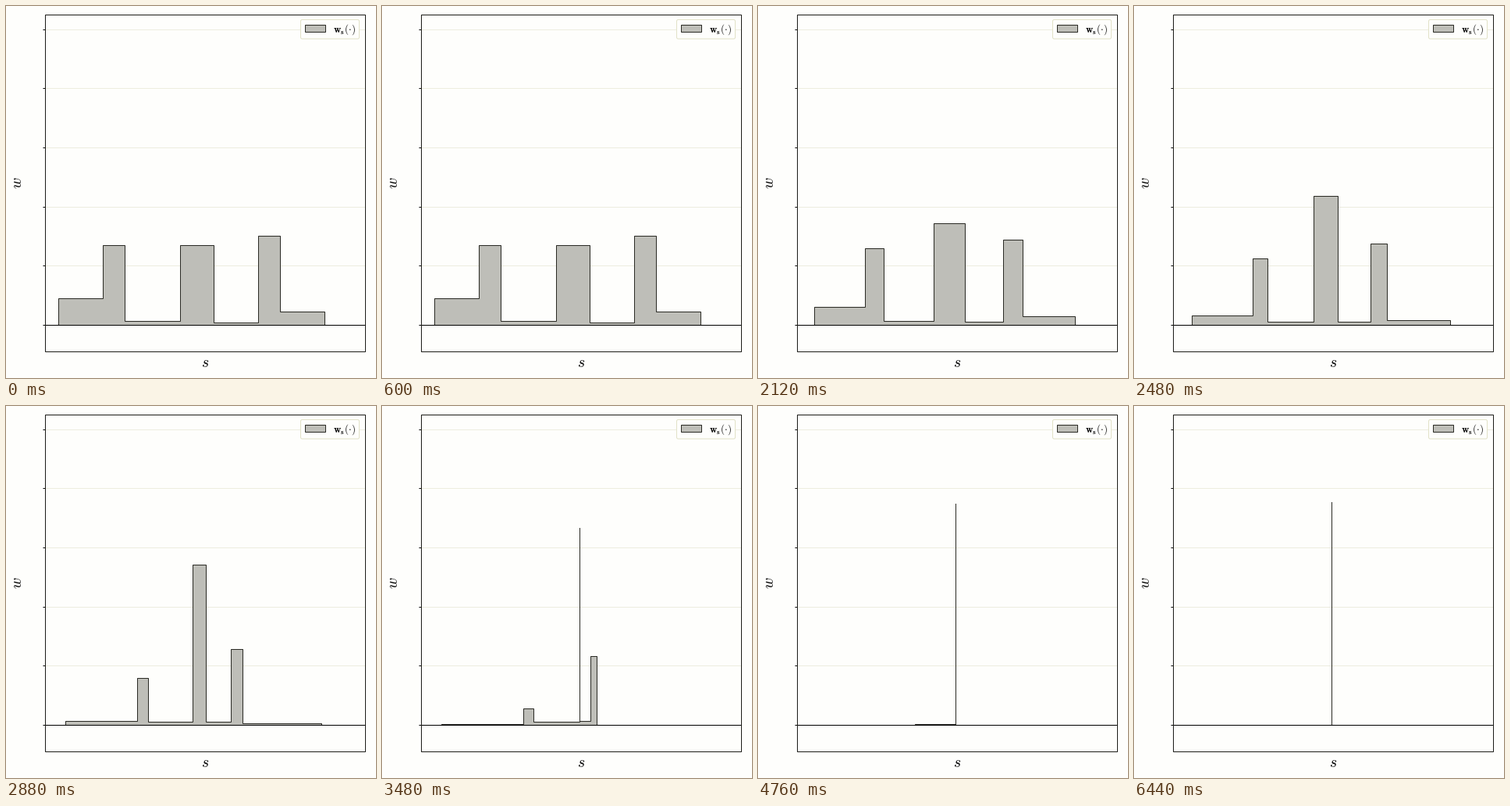
A matplotlib script for the animation above (6480 ms loop, 474 by 476 pixels).

```python
import numpy as np
import matplotlib.pyplot as plt
from matplotlib.animation import FuncAnimation
from matplotlib.patches import FancyBboxPatch, Polygon, Rectangle

W, H, DPI = 474, 476, 100
PX = 72 / DPI                      # one pixel in points
STEP, LOOP = 40, 6480
START = 1500                       # ms before the steps begin to move
BASE, PEAK = 408, 253              # zero line, place of the final spike
PAPER, FILL, EDGE = "#fefefc", "#bebeb8", "#2a2a24"
GRID, FRAME = "#dedec4", "#e2e2c8"

# Step widths and heights at rest, in grid units
FIRST = 67 + 14.21 * np.cumsum([0, 4, 2, 5, 3, 4, 2, 4])
LEVEL = 11.38 * np.array([3, 9, 0.4, 9, 0.3, 10, 1.5])


def settle(a, b, t, tau, power=2):
    """Glide from a to b: slow start, long soft landing."""
    u = max(t - START, 0) / tau
    return b + (a - b) * np.exp(-u ** power)


def edges(t):
    """Outer edges creep in; inner ones run into the spike and stop there."""
    a, b, c, d, e, f, g, h = FIRST
    return [
        settle(a, 76, t, 740),
        settle(b, 185.5, t, 1240),
        settle(c, 201.5, t, 1430),
        min(settle(d, 262, t, 1710, 3), PEAK),
        max(settle(e, PEAK - 1, t, 1310, 3), PEAK),
        max(settle(f, 239, t, 1890), PEAK),
        max(settle(g, 239, t, 1850), PEAK),
        settle(h, 404, t, 740),
    ]


def levels(t):
    """The middle step grows into the spike while the others drain."""
    a, b, c, d, e, f, g = LEVEL
    return [
        settle(a, 0, t, 970),
        settle(b, 0, t, 1700, 3),
        settle(c, 0, t, 3100, 3),
        settle(d, 285, t, 1520),
        settle(e, 5, t, 1500),
        settle(f, 80, t, 1680),
        settle(g, 0, t, 970),
    ]


def outline(t):
    x = np.repeat(edges(t), 2)
    y = np.repeat(levels(t), 2)
    return np.column_stack([x, BASE - np.concatenate([[0], y, [0]])])


plt.rcParams["mathtext.fontset"] = "cm"
fig = plt.figure(figsize=(W / DPI, H / DPI), dpi=DPI, facecolor=PAPER)
ax = fig.add_axes([0, 0, 1, 1])
ax.set(xlim=(0, W), ylim=(H, 0))
ax.axis("off")


def line(x0, x1, y, color="black", z=3, **kw):
    ax.plot([x0, x1], [y, y], color=color, lw=PX, zorder=z,
            solid_capstyle="butt", dash_capstyle="butt", **kw)


def box(x, y, w, h, **kw):
    ax.add_patch(Rectangle((x, y), w, h, lw=PX, **kw))


def label(x, y, s, size, **kw):
    ax.text(x, y, s, fontsize=size * PX, zorder=6, **kw)


for k in range(6):
    y = BASE - 75.65 * k
    line(47, 50, y)
    if k:
        line(50, 460, y, GRID, 1, ls=(0, (1, 1)))
line(50, 460, BASE)
box(50, 11, 410, 431, fill=False, ec="#1c1c18", zorder=4)

shape = Polygon(outline(0), closed=True, fc=FILL, ec=EDGE, lw=PX, zorder=2,
                joinstyle="miter")
ax.add_patch(shape)

ax.add_patch(FancyBboxPatch((379.5, 19.5), 71, 20.5, fc=PAPER, ec=FRAME,
                            boxstyle="round,pad=2,rounding_size=2",
                            lw=PX, zorder=5))
box(383, 24, 26, 9, fc=FILL, ec=EDGE, zorder=6)
label(419.5, 33.5, r"$\mathbf{w_s}(\cdot)$", 13, va="baseline")
label(255.5, 456, "$s$", 19.5, ha="center", va="center")
label(14.5, 226, "$w$", 19.5, ha="center", va="center", rotation=90)


def update(i):
    shape.set_xy(outline(i * STEP))
    return (shape,)


anim = FuncAnimation(fig, update, frames=LOOP // STEP, interval=STEP,
                     repeat=True, repeat_delay=0)
plt.show()
```
